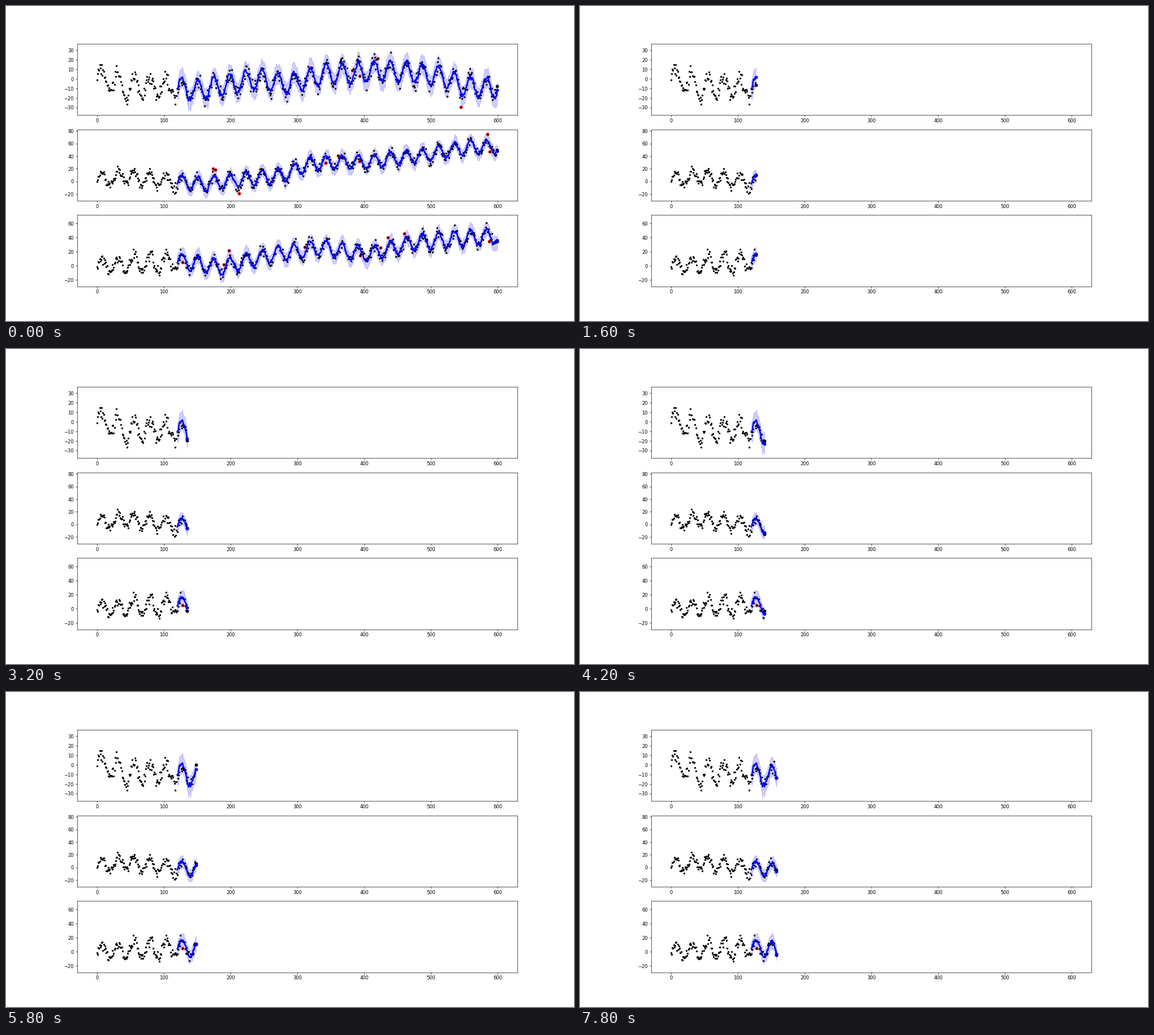
These frames come from a looping animation (1004x558 px, 8000 ms). A matplotlib script:

```python
import numpy as np
import matplotlib.pyplot as plt
from matplotlib.animation import FuncAnimation

W, H, DPI = 1004, 558, 60
FRAMES, STEP_MS = 40, 200
START, END = 120, 599          # first and last forecast step
PERIOD, PEAK = 24, 7           # length of a season and its first high point
BAND = 9.5                     # half height of the confidence band

rng = np.random.default_rng(4)
t = np.arange(END + 1)

# trend: key points (step, level)
# alarms: steps of outliers, negative where the value falls below the band
SERIES = [
    dict(ylim=(-37.9, 36.8), ticks=range(-30, 31, 10), amp=10.5,
         trend=[(0, 3), (45, -8.5), (85, -7), (150, -12), (240, 0),
                (288, -6), (335, 4.5), (440, 9), (520, 2), (550, -8),
                (599, -9.5)],
         alarms=[382, -393, 420, -545]),
    dict(ylim=(-30.5, 82.5), ticks=range(-20, 81, 20), amp=11,
         trend=[(0, 2), (40, 7), (110, 0), (160, -4), (250, 7), (275, 9),
                (320, 29), (400, 31), (490, 41), (550, 54), (599, 55)],
         alarms=[174, 177, -213, -342, 361, -393, 584, -588]),
    dict(ylim=(-29.3, 72.2), ticks=range(-20, 61, 20), amp=11,
         trend=[(0, 0), (60, 4), (130, 6), (185, -2), (260, 15), (335, 26),
                (405, 16), (475, 33), (599, 43)],
         alarms=[-128, 190, 197, 311, -394, 424, 435, 460, -587]),
]


def noise(sd):
    return sd * np.clip(rng.normal(size=t.size), -2.2, 2.2)


def build(s):
    """Forecast mean, band edges and observed values for every step."""
    season = s["amp"] * np.cos(2 * np.pi * (t - PEAK) / PERIOD)
    level = np.interp(t, *zip(*s["trend"])) + season
    mean = level + noise(1.3)
    low = mean - BAND + noise(1.2)
    high = mean + BAND + noise(1.2)
    obs = level + noise(4)
    for a in s["alarms"]:
        obs[abs(a)] = mean[abs(a)] + np.sign(a) * (BAND + 1.5)
    return mean, low, high, obs


class Panel:
    def __init__(self, ax, s):
        self.ax, self.band = ax, None
        self.mean, self.low, self.high, self.obs = build(s)
        self.alarm_x = np.abs(s["alarms"])
        ax.set(xlim=(-29.95, 628.95), ylim=s["ylim"],
               xticks=range(0, 601, 100), yticks=list(s["ticks"]))
        self.alarms, = ax.plot([], [], "ro", zorder=2)
        self.dots, = ax.plot([], [], "k.", zorder=2.1)
        self.line, = ax.plot([], [], "b-", lw=3, zorder=2.2)
        self.now, = ax.plot([], [], "ko", zorder=2.3)
        self.guess, = ax.plot([], [], "bo", zorder=2.4)

    def show(self, n):
        f = slice(START, n + 1)
        self.dots.set_data(t[:n + 1], self.obs[:n + 1])
        self.line.set_data(t[f], self.mean[f])
        self.now.set_data([n], [self.obs[n]])
        self.guess.set_data([n], [self.mean[n]])
        hit = self.alarm_x[self.alarm_x <= n]
        self.alarms.set_data(hit, self.obs[hit])
        if self.band:
            self.band.remove()
        self.band = self.ax.fill_between(t[f], self.low[f], self.high[f],
                                         color="b", alpha=0.2, zorder=1)


fig, axes = plt.subplots(3, 1, figsize=(W / DPI, H / DPI), dpi=DPI)
fig.subplots_adjust(left=0.125, right=0.9, bottom=0.11, top=0.88, hspace=0.2)
panels = [Panel(ax, s) for ax, s in zip(axes, SERIES)]


def draw(i):
    # the loop opens on the finished forecast, then starts over
    n = END if i == 0 else START - 1 + i
    for p in panels:
        p.show(n)
    return []


anim = FuncAnimation(fig, draw, frames=FRAMES, init_func=lambda: [],
                     interval=STEP_MS, repeat=True, repeat_delay=0)
plt.show()
```
